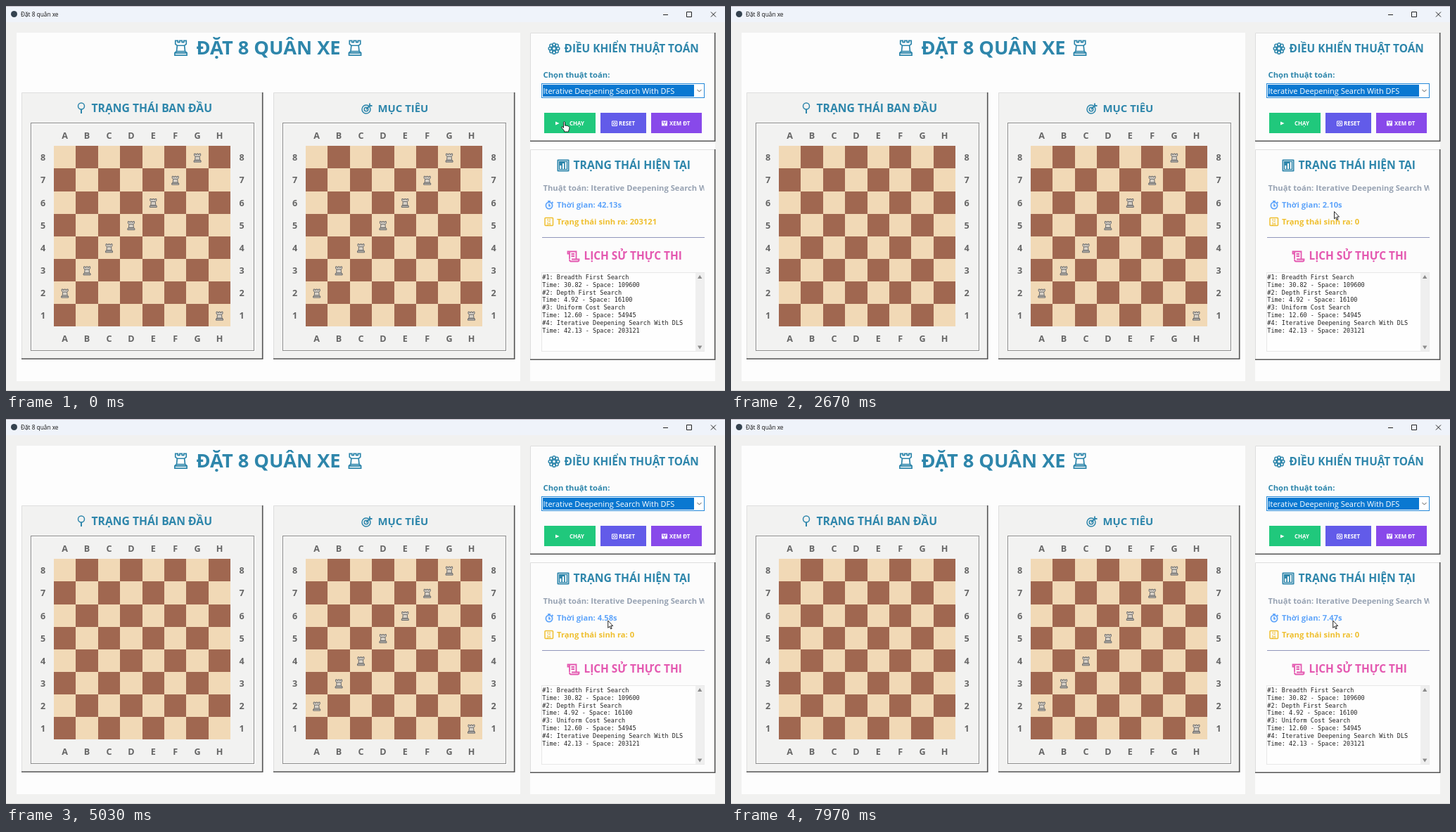
These frames come from a looping animation (1022 by 548 pixels, 8 s). An HTML page:

```html
<!DOCTYPE html>
<html lang="vi">
<head>
<meta charset="utf-8">
<title>Đặt 8 quân xe</title>
<style>
html, body { margin: 0; width: 100%; height: 100%; overflow: hidden; background: #f1f1f0; }
svg { display: block; width: 1022px; height: 548px; }
text { font: 700 15.4px "Open Sans", "Noto Sans", sans-serif; white-space: pre; }
.teal { fill: #2e86ab; }
.line { fill: none; stroke: #2e86ab; stroke-width: 1.5; }
.label { font-size: 11.2px; }
.btn { font-size: 7.9px; fill: #fff; }
.axis { font-size: 12.6px; fill: #666; text-anchor: middle; }
.log { font: 8.53px "DejaVu Sans Mono", monospace; fill: #222; }
.rook { fill: none; stroke-width: 1; }
</style>
</head>
<body>
<svg viewBox="0 0 1022 548">
  <defs>
    <g id="rook">
      <path d="M-4.5-6h2v1.3h1.5V-6h2v1.3h1.5V-6h2v2.8L3-2l.5 4.8L5 4v2H-5V4l1.5-1.2L-3-2-4.5-3.2z"/>
      <path d="M-3-2H3M-3.5 2.8h7M-5 4.2H5"/>
    </g>
    <clipPath id="side"><rect x="762" y="245" width="230.5" height="30"/></clipPath>
  </defs>

  <!-- window -->
  <rect width="1022" height="548" fill="#f1f1f0"/>
  <rect width="1022" height="23" fill="#eff3fa"/>
  <path d="M0 .5H1022" stroke="#c3bcc6"/>
  <path d="M0 547.5H1022" stroke="#d4d4d4"/>
  <circle cx="11.5" cy="11.5" r="4.5" fill="#34424f"/>
  <text x="21" y="14.8" style="font-size:8.3px;font-weight:400" fill="#111">Đặt 8 quân xe</text>
  <path d="M934 12.5h7M967.5 8.5h7v7h-7zM1002 8.5l7 7m0-7l-7 7" fill="none" stroke="#222"/>

  <!-- panels -->
  <path d="M15 38H731V534H15zM745 38h263V534H745z" fill="#fdfdfd"/>
  <g id="cards"></g>

  <!-- heading -->
  <g class="rook" stroke="#2e86ab">
    <use href="#rook" transform="translate(248.5 59.7)scale(1.72)"/>
    <use href="#rook" transform="translate(496 59.7)scale(1.72)"/>
  </g>
  <text class="teal" x="270.5" y="69" style="font-size:27.2px">ĐẶT 8 QUÂN XE</text>

  <g class="line">
    <circle cx="107" cy="142.5" r="4.5"/><path d="M107 147v6" stroke-width="2"/>
    <circle cx="512" cy="147" r="6"/><circle cx="512" cy="147" r="2.8"/>
    <path d="M512 147l6-6m-1-2.5v3.5h3.5" stroke-width="1.8"/>
  </g>
  <text class="teal" x="121.5" y="151" style="font-size:15.7px">TRẠNG THÁI BAN ĐẦU</text>
  <text class="teal" x="528.5" y="151" style="font-size:14.9px">MỤC TIÊU</text>
  <g id="boards"></g>

  <!-- controls -->
  <g id="gear" class="line"><circle cx="779" cy="60.5" r="2.6"/></g>
  <text class="teal" x="793.5" y="66">ĐIỀU KHIỂN THUẬT TOÁN</text>
  <text class="teal label" x="763.5" y="102">Chọn thuật toán:</text>
  <rect x="761.5" y="110.5" width="231" height="20" fill="#fff" stroke="#2488d8"/>
  <rect x="763" y="112" width="215" height="17" fill="#0a78d1"/>
  <path d="M982.5 119l3 3 3-3" fill="none" stroke="#555"/>
  <text x="763.5" y="125" style="font-size:11px;font-weight:400" fill="#fff">Iterative Deepening Search With DFS</text>
  <path d="M765 152h73v29h-73z" fill="#20c87c"/>
  <path d="M845 152h65v29h-65z" fill="#625be9"/>
  <path d="M917 152h72v29h-72z" fill="#8849ea"/>
  <path d="M781 164.5l5.5 2.5-5.5 2.5z" fill="#fff"/>
  <path d="M861.5 164h7v6.5h-7zM863.5 166h3v2.5h-3z" fill="none" stroke="#fff"/>
  <path d="M932 163.5h8v7h-8z" fill="#fff"/>
  <path d="M934 164v2.5h4V164M935 169h2" fill="none" stroke="#8849ea"/>
  <text class="btn" x="801" y="169.8">CHẠY</text>
  <text class="btn" x="871" y="169.8">RESET</text>
  <text class="btn" x="943" y="169.8">XEM ĐT</text>

  <!-- status -->
  <rect class="teal" x="783.5" y="218.5" width="17" height="17" rx="1"/>
  <path d="M785.5 220.5h13v13h-13z" fill="none" stroke="#fdfdfd" stroke-width=".7"/>
  <path d="M788.3 232v-5m3.7 5v-8m3.7 8v-10" stroke="#fdfdfd" stroke-width="2"/>
  <text class="teal" x="806.5" y="232" style="font-size:15.7px">TRẠNG THÁI HIỆN TẠI</text>
  <text class="label" x="763.5" y="263" clip-path="url(#side)" fill="#98a3b3">Thuật toán: Iterative Deepening Search With DFS</text>
  <g fill="none" stroke="#60a5fa" stroke-width="1.8">
    <circle cx="772" cy="284" r="4.6"/><path d="M770 277.8h4M772 278v2M772 281.5v3h2M776 279l1.5 1.5"/>
  </g>
  <text id="time" class="label" x="783" y="287" fill="#60a5fa"></text>
  <rect x="766" y="301.5" width="11.5" height="11" rx="1" fill="none" stroke="#efbf2f" stroke-width="1.5"/>
  <g fill="#efbf2f"><text x="768.5" y="306.7" style="font-size:5px">12</text><text x="768.5" y="311.5" style="font-size:5px">34</text></g>
  <text id="count" class="label" x="783" y="311" fill="#efbf2f"></text>
  <path d="M762 329.5h231" stroke="#9196bb"/>

  <!-- history -->
  <path d="M801 360v-10.5h-2.5v3h2.5M799.5 349.5h11V360M804 360.5h10.5v1q0 2-2 2h-9.5q-2 0-2-3M803.5 353h4.5M803.5 356h4.5"
    fill="none" stroke="#e458b0" stroke-width="1.8"/>
  <text x="821.5" y="361" fill="#e458b0">LỊCH SỬ THỰC THI</text>
  <rect x="761.5" y="379.5" width="231" height="112" fill="#fefefe" stroke="#e8e8e8"/>
  <rect x="980" y="380" width="12.5" height="111" fill="#efefef"/>
  <path d="M983 388l3.2-5 3.2 5zM983 483.5l3.2 5 3.2-5z" fill="#8b8b8b"/>
  <g id="history"></g>

  <!-- pointers -->
  <path id="hand" fill="#fff" stroke="#111" stroke-width=".9" stroke-linejoin="round"
    d="M-1 0q1-1.3 2 0V5l1.5-.4 1 .7 1.3-.1 1 .8 1 .3q.7.5.6 2.2-.1 2.2-1.2 3.5v1.7H0V12.2L-3.6 8q-.9-1.6.7-1.6L-1 8z"/>
  <path id="arrow" fill="#fff" stroke="#111" stroke-width=".9" d="M0 0V10.3L2.3 8.2 3.9 11.8 5.5 11.1 3.9 7.5H7z"/>
</svg>
<script>
const $ = id => document.getElementById(id);
const cellW = 31.4, cellH = 32.15, files = "ABCDEFGH";

function card(x, y, w, h, fill) {
  return `<path d="M${x} ${y}h${w}v${h}h${-w}z" fill="${fill}"/>
    <path d="M${x + .5} ${y + h}V${y + .5}H${x + w}" fill="none" stroke="#dedede"/>
    <path d="M${x} ${y + h - .8}H${x + w - .8}V${y}" fill="none" stroke="#555" stroke-width="1.6"/>`;
}

function board(dx, id) {
  let out = `<rect x="36.5" y="167.5" width="317" height="324" fill="none" stroke="#fff"/>
    <rect x="35.5" y="166.5" width="317" height="324" fill="none" stroke="#8b8b8b"/>`, rooks = "";
  for (let i = 0; i < 8; i++) {
    const x = 83.7 + i * cellW, y = 215.5 + i * cellH;
    for (const ty of [188.5, 477.5]) out += `<text class="axis" x="${x}" y="${ty}">${files[i]}</text>`;
    for (const tx of [52.5, 335]) out += `<text class="axis" x="${tx}" y="${y + 4.7}">${8 - i}</text>`;
    for (let j = 0; j < 8; j++)
      out += `<rect x="${68 + i * cellW}" y="${199.2 + j * cellH}" width="${cellW}" height="${cellH}"
        shape-rendering="crispEdges" fill="${(i + j) % 2 ? "#a06750" : "#f1d9b6"}"/>`;
    const row = (14 - i) % 8;
    rooks += `<use href="#rook" x="${x}" y="${216.2 + row * cellH}"/>`;
  }
  return `<g transform="translate(${dx})">${out}<g id="${id}" class="rook" stroke="#6c6c6c" style="fill:#d9d2c8">${rooks}</g></g>`;
}

$("cards").innerHTML = card(22, 123, 343.5, 380, "#f2f2f1") + card(380, 123, 343.5, 380, "#f2f2f1")
  + card(745, 38, 263.5, 155, "#fcfcfc") + card(745, 204, 263.5, 300, "#fcfcfc");
$("boards").innerHTML = board(0, "startRooks") + board(358, "goalRooks");

for (let i = 0; i < 8; i++) {
  const a = i * Math.PI / 4;
  $("gear").innerHTML += `<circle cx="${779 + 5.7 * Math.cos(a)}" cy="${60.5 + 5.7 * Math.sin(a)}" r="2.1"/>`;
}

const runs = [
  ["Breadth First Search", "30.82", 109600],
  ["Depth First Search", "4.92", 16100],
  ["Uniform Cost Search", "12.60", 54945],
  ["Iterative Deepening Search With DLS", "42.13", 203121]
];
$("history").innerHTML = runs.flatMap(([name, time, space], i) =>
  [`#${i + 1}: ${name}`, `Time: ${time} - Space: ${space}`])
  .map((s, i) => `<text class="log" x="762.3" y="${388.6 + i * 10.95}">${s}</text>`).join("");

const clickAt = 430;
// [ms, seconds shown]
const clock = [[clickAt, 0], [1330, .85], [2670, 2.1], [4230, 3.7], [5930, 5.47], [6870, 6.47], [7970, 7.47], [8200, 7.69]];
// [ms, x, y]
const path = [[0, 793.5, 165.3], [300, 794.5, 164.3], [1650, 794.5, 164.3], [2400, 857.5, 292.6],
  [3000, 857.5, 292.6], [3500, 858.5, 289.6], [4400, 858.5, 289.6], [4900, 855.7, 287], [8000, 855.7, 287]];

function segment(keys, t) {
  let i = 0;
  while (i < keys.length - 2 && t >= keys[i + 1][0]) i++;
  const [a, b] = [keys[i], keys[i + 1]];
  return [a, b, (t - a[0]) / (b[0] - a[0])];
}

// The clock label refreshes about every 0.11 s.
function elapsed(t) {
  const [a, b, p] = segment(clock, t);
  const ticks = Math.round((b[1] - a[1]) / .109);
  return a[1] + Math.floor(p * ticks + .5) / ticks * (b[1] - a[1]);
}

function draw(t) {
  const running = t >= clickAt;
  $("time").textContent = `Thời gian: ${running ? elapsed(t).toFixed(2) : "42.13"}s`;
  $("count").textContent = `Trạng thái sinh ra: ${running ? 0 : 203121}`;
  $("startRooks").style.display = running ? "none" : "";

  const [a, b, p] = segment(path, t), e = p * p * (3 - 2 * p);
  const x = a[1] + (b[1] - a[1]) * e, y = a[2] + (b[2] - a[2]) * e;
  const onButton = x < 838 && y < 181;
  for (const id of ["hand", "arrow"]) {
    $(id).setAttribute("transform", `translate(${x} ${y})`);
    $(id).style.display = (id === "hand") === onButton ? "" : "none";
  }
}

const begin = performance.now();
function frame() {
  draw((performance.now() - begin) % 8000);
  requestAnimationFrame(frame);
}
draw(0);
requestAnimationFrame(frame);
</script>
</body>
</html>
```
